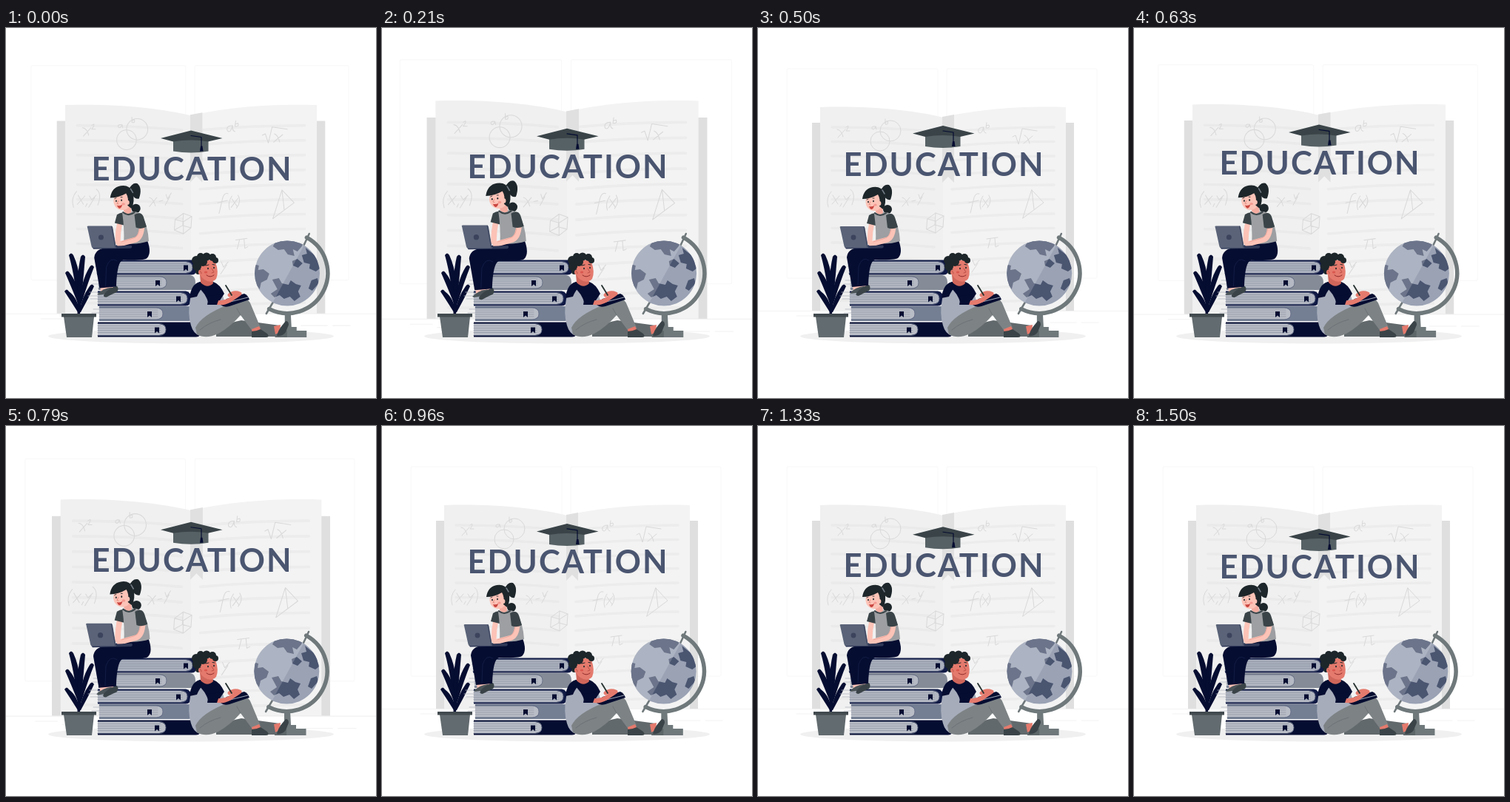
An HTML page with a canvas for the animation above (1.54 s loop, 500 by 500 pixels).

```html
<!DOCTYPE html>
<html lang="en">
<head>
<meta charset="utf-8">
<title>Education</title>
<style>
html, body { margin: 0; width: 100%; height: 100%; overflow: hidden; background: #fff; }
canvas { display: block; width: 500px; height: 500px; }
</style>
</head>
<body>
<canvas id="stage"></canvas>
<script>
const LOOP = 1540, STEPS = 37;
const canvas = document.getElementById('stage');
const ctx = canvas.getContext('2d');
const ratio = window.devicePixelRatio || 1;
canvas.width = canvas.height = 500 * ratio;

const NAVY = '#050d31', DARK = '#3a4448', HAIR = '#1d262a', STEEL = '#6f787b',
      PINK = '#fcc3b7', SALMON = '#e47a6d', SLATE = '#4a5570';

// Linear keyframes as [progress, value] pairs
const PULSE = [[0, 1], [.1, 1.1], [.3, 1], [.4, 1], [.5, 1.1], [.6, 1], [1, 1]];
const SHAKE = [[0, 0], [.1, -1], [.2, 2], [.3, -4], [.4, 4], [.5, -4], [.6, 4], [.7, -4], [.8, 2], [.9, -1], [1, 0]];
const FLOAT = [[0, 0], [.5, -10], [1, 0]];

function at(keys, p) {
  const i = Math.max(1, keys.findIndex(k => k[0] >= p));
  const [p0, v0] = keys[i - 1], [p1, v1] = keys[i];
  return v0 + (v1 - v0) * (p - p0) / (p1 - p0);
}

function fill(d, color) {
  ctx.fillStyle = color;
  ctx.fill(new Path2D(d));
}

function line(d, color, width = 1) {
  ctx.strokeStyle = color;
  ctx.lineWidth = width;
  ctx.stroke(new Path2D(d));
}

function oval(x, y, rx, ry, color, angle = 0) {
  ctx.fillStyle = color;
  ctx.beginPath();
  ctx.ellipse(x, y, rx, ry, angle, 0, Math.PI * 2);
  ctx.fill();
}

function box(x, y, w, h, color) {
  ctx.fillStyle = color;
  ctx.fillRect(x, y, w, h);
}

function scaled(x, y, s, draw) {
  ctx.save();
  ctx.translate(x, y);
  ctx.scale(s, s);
  ctx.translate(-x, -y);
  draw();
  ctx.restore();
}

function shifted(x, y, draw) {
  ctx.save();
  ctx.translate(x, y);
  draw();
  ctx.restore();
}

function backdrop() {
  line('M41 55H241Q243 55 243 57V336Q243 338 241 338H41Q39 338 39 336V57Q39 55 41 55Z' +
       'M257 55H456Q458 55 458 57V336Q458 338 456 338H257Q255 338 255 336V57Q255 55 257 55Z', '#f8f8f8');
  line('M0 382.5H500M52 389H80M395 398H430M437 398H460M86 393H102', '#f2f2f2');

  box(73, 128, 354, 254, '#dfdfdf');
  fill('M84 107C150 105 210 111 250 121V382H84Z', '#f0f0f0');
  fill('M416 107C350 105 290 111 250 121V382H416Z', '#f3f3f3');
  for (let y = 134; y < 372; y += 19.5) {
    line(`M100 ${y}Q172 ${y} 238 ${y + 6}`, '#eaeaea', 3.5);
    line(`M400 ${y}Q328 ${y} 262 ${y + 6}`, '#ececec', 3.5);
  }
  fill('M249 120L265 117V209L257 201L249 209Z', '#e0e0e0');
  sketches();
}

function sketches() {
  const ink = '#d9d9d9';
  ctx.strokeStyle = ink;
  ctx.lineWidth = 1;
  for (const [x, y, r] of [[165, 153, 13], [179, 139, 14]]) {
    ctx.beginPath();
    ctx.arc(x, y, r, 0, Math.PI * 2);
    ctx.stroke();
  }
  line('M107 137Q113 138 115 147M118 137L108 148M119 134Q124 130 121 136L119 139H124' +
       'M159 133Q153 132 154 136Q157 139 159 133L160 137M172 123V130Q177 131 175 126L172 128', ink);
  line('M305 134Q296 134 298 141Q302 145 305 134Q304 141 308 142M309 128L308 135Q314 136 312 131L309 132' +
       'M344 147L348 145L352 157L357 136L377 139M360 145Q365 147 367 156M371 146L359 156', ink);
  line('M99 221Q91 230 95 242M101 226L108 238M110 227L100 238M113 237L111 241M116 227L119 232L125 226M123 229L115 242M125 218Q133 224 127 239' +
       'M195 229Q200 230 203 240M205 229L195 241M208 234L213 233M217 225L219 231L224 223M222 228L216 239', ink);
  line('M229 258L240 250L251 254L250 269L240 277L228 272Z M229 258L240 261L251 254M240 261V277M240 250L239 266L228 272M239 266L250 269', ink);
  line('M299 224Q293 222 291 233L287 250M285 236L298 233M304 227Q298 236 301 245M304 231L311 241M312 230L303 242M312 226Q317 234 310 243' +
       'M370 219L386 236L358 257Z M370 219L373 245' +
       'M309 285L324 283M314 285L311 297M320 284L321 296L325 294M290 314L293 321L299 314M297 318L289 330', ink);
}

// Tapered leaf from its foot (x0, y0) to its tip (x1, y1), bent sideways
function leaf(x0, y0, x1, y1, bend) {
  const mx = x0 + (x1 - x0) * .6 + bend, my = y0 + (y1 - y0) * .6;
  fill(`M${x0} ${y0}Q${mx - 5} ${my + 2} ${x1 - 3} ${y1 + 2}Q${x1} ${y1 - 3} ${x1 + 3} ${y1 + 2}Q${mx + 6} ${my} ${x0 + 2} ${y0}Z`, NAVY);
}

function plant() {
  leaf(98, 386, 88, 305, 7);
  leaf(98, 386, 104, 307, -3);
  leaf(100, 372, 116, 321, -4);
  leaf(97, 372, 83, 329, 4);
  leaf(97, 384, 82, 354, 4);
  leaf(99, 384, 116, 347, -2);
  line('M98 386Q99 360 99 340M98 386Q102 355 110 336', NAVY, 3);
  fill('M78 390H119L116 418H82Z', '#626b6f');
  box(75, 386, 47, 4.5, '#424b4f');
}

function book(y, left, pageEnd, right, cover, paper, mark) {
  const end = pageEnd - 9;
  fill(`M${left} ${y}H${right - 7}Q${right} ${y + 1} ${right} ${y + 10}Q${right} ${y + 20} ${right - 7} ${y + 20}H${left}Z`, cover);
  fill(`M${left} ${y + 2.5}H${end}Q${pageEnd} ${y + 3} ${pageEnd} ${y + 10}Q${pageEnd} ${y + 17} ${end} ${y + 17.5}H${left}Z`, paper);
  for (let i = 5; i < 17; i += 3) {
    line(`M${left} ${y + i}H${end + 2}`, '#8d94a2', .7);
  }
  line(`M${left} ${y + 2}H${end}Q${pageEnd} ${y + 2} ${pageEnd} ${y + 10}Q${pageEnd} ${y + 18} ${end} ${y + 18}H${left}`, '#5f6882', .8);
  fill(`M${mark} ${y + 7}h6v8l-3 -2.5l-3 2.5Z`, NAVY);
}

function stack() {
  line('M121 322H126M118 341H126M116 346H126M113 357H126M111 362H126M114 366H126M118 380H128M116 385H128', '#b3b7bf', .8);
  book(397.5, 124, 216, 264, NAVY, '#b9bdc6', 201);
  book(376, 126, 212, 254, '#747f94', '#b9bdc6', 191);
  book(355.5, 124, 245, 250, '#101a45', '#b1b6c1', 230);
  book(334, 125, 217, 256, '#858c97', '#b4b9c3', 202);
  book(313.5, 123, 252, 258, '#101a45', '#a9afbc', 240);
}

function girl() {
  // Shoes and legs
  fill('M128 349L147 347L146 354L129 356Z', PINK);
  fill('M124 358Q132 350 143 349L146 353Q138 358 126 359Z', '#4b5559');
  fill('M133 358Q139 350 150 347Q153 351 150 355Q143 358 136 362Q131 362 133 358Z', DARK);
  fill('M120 310Q121 299 134 297L168 289L190 287Q196 303 190 310Q188 314 158 313Q150 315 149 348L127 350Z', NAVY);
  line('M150 314Q141 308 136 322L135 347', '#16204a', .8);

  // Torso and arms
  oval(175, 245, 6, 6, HAIR);
  line('M154 262Q151 276 151 289', PINK, 7);
  fill('M150 253Q156 249 160 251L159 267L147 264Z', DARK);
  fill('M157 251Q170 246 182 252Q191 268 192 288Q177 293 159 291Q160 272 157 251Z', '#9d9fa2');
  line('M183 268Q182 283 175 286L153 292', PINK, 7);
  line('M180 270Q179 282 172 284L156 289', '#e79d92', .7);
  fill('M173 253Q182 248 185 256L189 269Q182 273 175 270Z', DARK);
  line('M158 250Q165 256 173 250', DARK, 2);

  // Head
  fill('M158 240L168 240L169 250Q164 254 159 249Z', '#f4aca0');
  fill('M165 221Q170 210 177 212Q184 218 179 232Q173 233 170 226Z', HAIR);
  oval(157, 235, 11.5, 12, PINK);
  fill('M141 231Q143 217 155 215Q166 213 171 223Q174 237 169 245L164 241Q166 231 162 225Q152 231 141 231Z', HAIR);
  line('M168 219L171 224', '#737c86', 1.5);
  oval(164, 237, 2.4, 3, PINK);
  oval(149, 235, .9, 1.2, HAIR);
  oval(156, 234, .9, 1.2, HAIR);
  line('M147 232L149 231M155 230L157 230', HAIR, .8);
  oval(158.5, 239, 2.2, 1.6, '#f49a91');
  line('M152 235L150 238.5L152 239', '#d9796e', .7);
  fill('M150 241Q154 242 157 240Q156 245 153 245Q151 244 150 241Z', '#c9453f');

  // Laptop
  fill('M117 295.5L169 293.5Q171 296 168 297.5L119 298.5Z', '#2f3857');
  fill('M112 268H142Q144 268 144.5 270L149 297H119Q117 297 116.5 295L111 270Q110 268 112 268Z', '#5a6378');
  line('M143 268.5L148 296', '#3d4660', 1.2);
  oval(129, 283, 3.4, 3.4, '#3b445c');
}

function boy() {
  // Far leg
  fill('M284 413Q300 397 318 395L370 402L366 417H284Z', '#62696c');
  fill('M362 403L371 401L370 411L364 414Z', SALMON);
  fill('M366 416Q368 408 373 402L378 396Q382 396 382 401L378 411Q374 417 366 416Z', DARK);

  // Torso
  fill('M261 345Q250 350 249 366Q245 386 250 402Q253 413 262 416L284 404L298 378L290 352Q284 345 276 345Z', '#a6acba');
  fill('M262 343Q250 346 248 365L258 363Q261 355 268 348Z', NAVY);
  fill('M262 343L280 343Q289 346 295 359L285 374L274 373Q270 358 259 350Z', NAVY);

  // Near leg
  fill('M256 405Q264 388 300 374L316 367Q327 363 331 374L344 405L334 411L317 388Q303 404 287 413Q270 421 258 414Z', '#7d8385');
  line('M317 388L312 379M262 408Q274 398 290 394', '#666d70', .8);
  fill('M332 407L342 403L345 409L333 413Z', SALMON);
  fill('M332 410Q338 410 344 407L353 413Q357 418 351 418H332Z', DARK);

  // Notebook and hands
  fill('M290 374L298 366L322 359Q327 361 329 367L302 376Q294 378 290 374Z', NAVY);
  line('M292 373L303 370L327 364', '#cfd3dc', .8);
  line('M281 369Q290 374 302 368L314 360', SALMON, 6);
  line('M302 361Q308 356 316 359', SALMON, 5);
  line('M297 348L305 361', '#26312f', 1.8);
  fill('M274 362L290 360L285 374L272 374Z', NAVY);

  // Head
  fill('M262 333L279 338L280 345Q272 353 263 344Z', '#cf665b');
  fill('M260 319Q269 310 283 316Q288 330 284 339Q277 346 268 340Q260 335 260 319Z', SALMON);
  for (const [x, y, r] of [[257, 314, 6], [263, 309, 5], [271, 309, 5.5], [279, 310, 5], [283, 314, 4], [258, 322, 6], [260, 329, 4], [266, 316, 6]]) {
    oval(x, y, r, r, HAIR);
  }
  oval(263, 330, 3, 3.6, SALMON);
  line('M262 329Q264 328 264 332', '#b3473f', .8);
  oval(273, 325, .9, 1.3, HAIR);
  oval(281, 324, .9, 1.3, HAIR);
  line('M270 321L274 320M279 319.5L282 320', HAIR, 1);
  line('M278 325L281 330L278 331', '#b3473f', .8);
  line('M271 334Q276 338 281 334', '#8e2c2a', 1);
  oval(270, 330, 2.2, 1.6, '#d9574f');
}

function globe() {
  fill('M377 385H385L386 404H393V409H372V404H377Z', STEEL);
  box(364, 409, 42.5, 9, STEEL);
  box(364, 409, 16, 9, '#5c6568');
  line('M410 278L403 293M352 386L362 369', STEEL, 2.5);
  ctx.strokeStyle = STEEL;
  ctx.lineWidth = 5.5;
  ctx.beginPath();
  ctx.arc(380.5, 331, 54.5, -1.07, 2.04);
  ctx.stroke();

  ctx.save();
  ctx.beginPath();
  ctx.arc(380.3, 331.5, 44, 0, Math.PI * 2);
  ctx.clip();
  box(336, 287, 90, 90, '#9aa2b4');
  fill('M366 286H404L400 295L394 302L388 299L390 308L381 306L376 299L368 300L361 295Z', SLATE);
  fill('M405 297L411 302L420 309L427 323L419 329L410 325L411 319L403 317L400 307L407 305Z', SLATE);
  fill('M387 315L394 312L401 318L395 324L388 321Z', SLATE);
  fill('M335 319L342 321L341 327L348 326L356 332L353 340L345 344L343 353L335 342Z', SLATE);
  fill('M360 340L369 338L373 345L382 347L385 341L392 346L399 348L395 356L398 363L390 369L384 363L376 366L370 361L363 364L358 359L367 353Z', SLATE);
  fill('M413 341L421 338L423 345L414 355L409 352Z', SLATE);
  fill('M335 286H404L404 292L359 374H335Z', 'rgba(255,255,255,.18)');
  ctx.restore();
}

function title() {
  fill('M226 148H273.5V167Q250 171 226 167Z', '#566165');
  fill('M209 149.5L250 139L292.5 149.5L273 154Q250 150 226 154Z', DARK);
  line('M250 146L264 148V163', NAVY, 1.2);
  fill('M263 160H265.5L266.5 167H262Z', NAVY);

  ctx.font = '700 43.5px Lato, Inter, sans-serif';
  ctx.letterSpacing = '2px';
  ctx.textAlign = 'center';
  ctx.fillStyle = SLATE;
  ctx.fillText('EDUCATION', 251.5, 206.5);
}

function render(time) {
  const step = Math.floor((time % LOOP) / LOOP * STEPS);
  const p = (step + .9) / STEPS;
  const pulse = at(PULSE, p);
  ctx.setTransform(ratio, 0, 0, ratio, 0, 0);
  ctx.lineCap = ctx.lineJoin = 'round';
  box(0, 0, 500, 500, '#fff');

  scaled(250, 228, pulse, backdrop);
  oval(250, 416.5, 193, 10, '#f0f0f0');
  shifted(0, at(FLOAT, p), title);
  plant();
  stack();
  scaled(152, 288, pulse, girl);
  shifted(at(SHAKE, p), 0, globe);
  boy();
}

const start = performance.now();
function tick() {
  render(performance.now() - start);
  requestAnimationFrame(tick);
}
tick();
</script>
</body>
</html>
```
